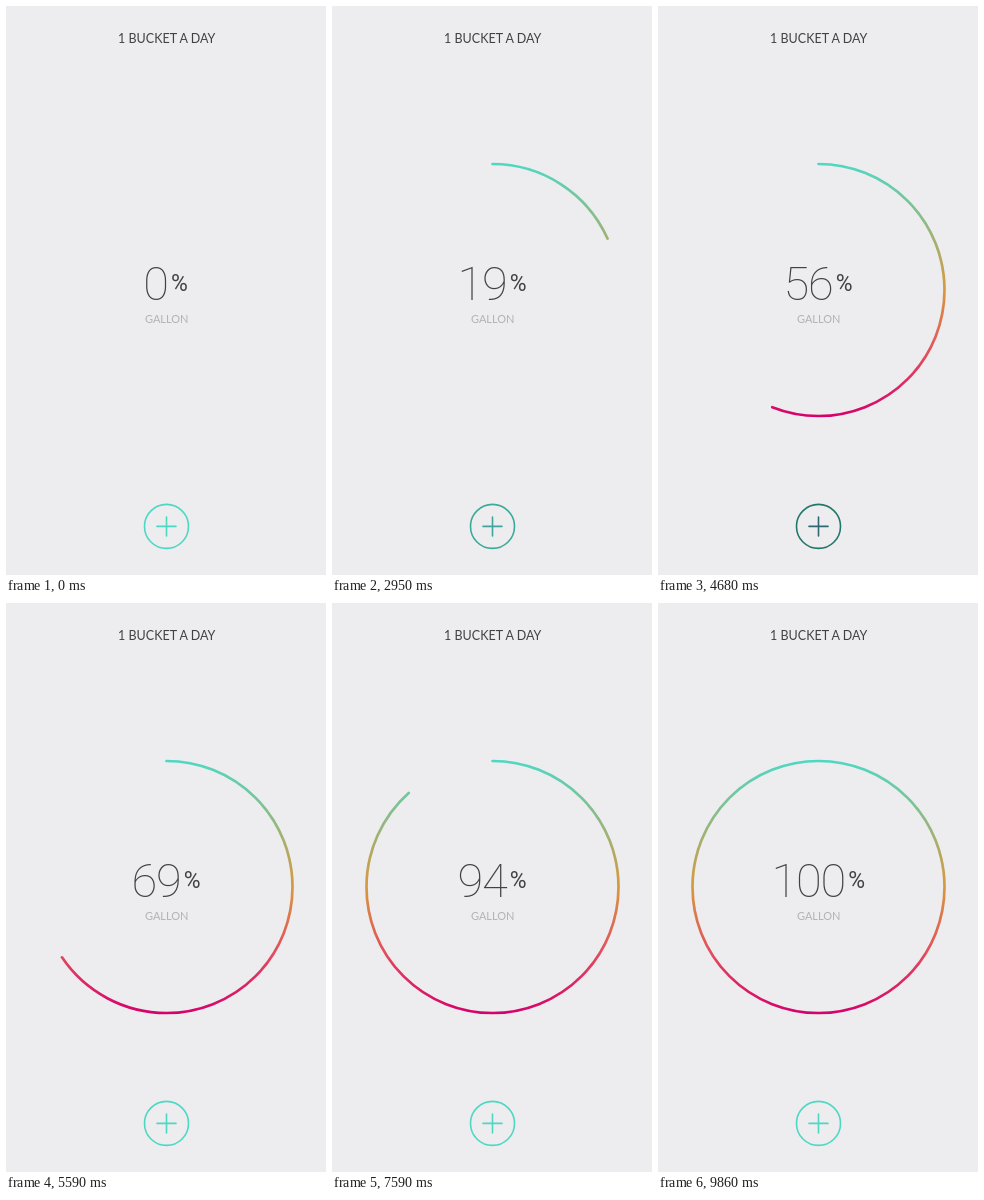
An HTML page for the animation above (9.9 s loop, 320 by 569 pixels).

```html
<!DOCTYPE html>
<html lang="en">
<head>
<meta charset="utf-8">
<title>Water tracker</title>
<style>
  html, body { margin: 0; width: 100%; height: 100%; overflow: hidden; background: #edecee; }
  svg { display: block; width: 100%; height: 100%; }
  text { fill: #434145; font-family: Lato, sans-serif; }
  .title { font-size: 12.5px; text-anchor: middle; }
  .unit { font-size: 11px; text-anchor: middle; fill: #b3b2b5; }
  .number { font: 200 47px Roboto, sans-serif; letter-spacing: -1.2px; text-anchor: end; }
  .percent { font: 400 23px Roboto, sans-serif; }
  .line { fill: none; stroke-linecap: round; }
</style>
</head>
<body>
<svg viewBox="0 0 320 569">
  <defs>
    <linearGradient id="tint" gradientUnits="userSpaceOnUse" x1="0" y1="157" x2="0" y2="411">
      <stop offset="0" stop-color="#4dd8c4"/>
      <stop offset=".25" stop-color="#92b880"/>
      <stop offset=".5" stop-color="#d9983e"/>
      <stop offset=".75" stop-color="#e2505c"/>
      <stop offset="1" stop-color="#d6006c"/>
    </linearGradient>
  </defs>
  <text class="title" x="160.7" y="37">1 BUCKET A DAY</text>
  <path id="arc" class="line" pathLength="100" stroke="url(#tint)" stroke-width="2.7"
        d="M160.5 158a126 126 0 0 1 0 252a126 126 0 0 1 0 -252"/>
  <text id="number" class="number" y="294"></text>
  <text id="percent" class="percent" y="285">%</text>
  <text class="unit" x="160.7" y="316.5">GALLON</text>
  <g class="line" stroke-width="1.6">
    <circle id="ring" cx="160.5" cy="520.4" r="22"/>
    <path id="plus" d="M151 520.4h19M160.5 511v19"/>
  </g>
</svg>
<script>
const LOOP = 9900, STEP = 6.25, GROW = 600, PRESS = 220;
const LIGHT = [77, 216, 196], DARK_RING = [35, 119, 106], DARK_PLUS = [47, 104, 114];

// Each tap: finger down, finger up (ms). The count rises on release.
const taps = [
  [50, 410], [1590, 1630], [2470, 2600], [2850, 3000],
  [3250, 3400], [3780, 3810], [3890, 3970], [4050, 4130],
  [4200, 4290], [4440, 4850], [5250, 5470], [5750, 5960],
  [6200, 6400], [6680, 6880], [7340, 7560], [7930, 8150]
];

const $ = id => document.getElementById(id);
const [arc, number, percent, ring, plus] =
  ['arc', 'number', 'percent', 'ring', 'plus'].map($);
const clamp = v => Math.max(0, Math.min(1, v));
const easeOut = p => 1 - (1 - clamp(p)) ** 3;
const mix = (a, b, k) => `rgb(${a.map((v, i) => Math.round(v + (b[i] - v) * k))})`;

function draw(t) {
  let count = 0, filled = 0, pressed = 0;
  for (const [down, up] of taps) {
    if (t >= up) {
      count++;
      filled += STEP * easeOut((t - up) / GROW);
    } else if (t >= down) {
      pressed = clamp((t - down) / PRESS);
    }
  }

  arc.style.display = filled > 0 ? '' : 'none';
  arc.setAttribute('stroke-dasharray', filled > 99.99 ? 'none' : `${filled} 200`);

  const label = String(Math.round(count * STEP));
  const shift = 12.6 * label.length;
  number.textContent = label;
  number.setAttribute('x', 149.3 + shift);
  percent.setAttribute('x', 152.5 + shift);

  ring.setAttribute('stroke', mix(LIGHT, DARK_RING, pressed));
  plus.setAttribute('stroke', mix(LIGHT, DARK_PLUS, pressed));
}

const start = performance.now();
function frame() {
  draw((performance.now() - start) % LOOP);
  requestAnimationFrame(frame);
}
frame();
</script>
</body>
</html>
```
